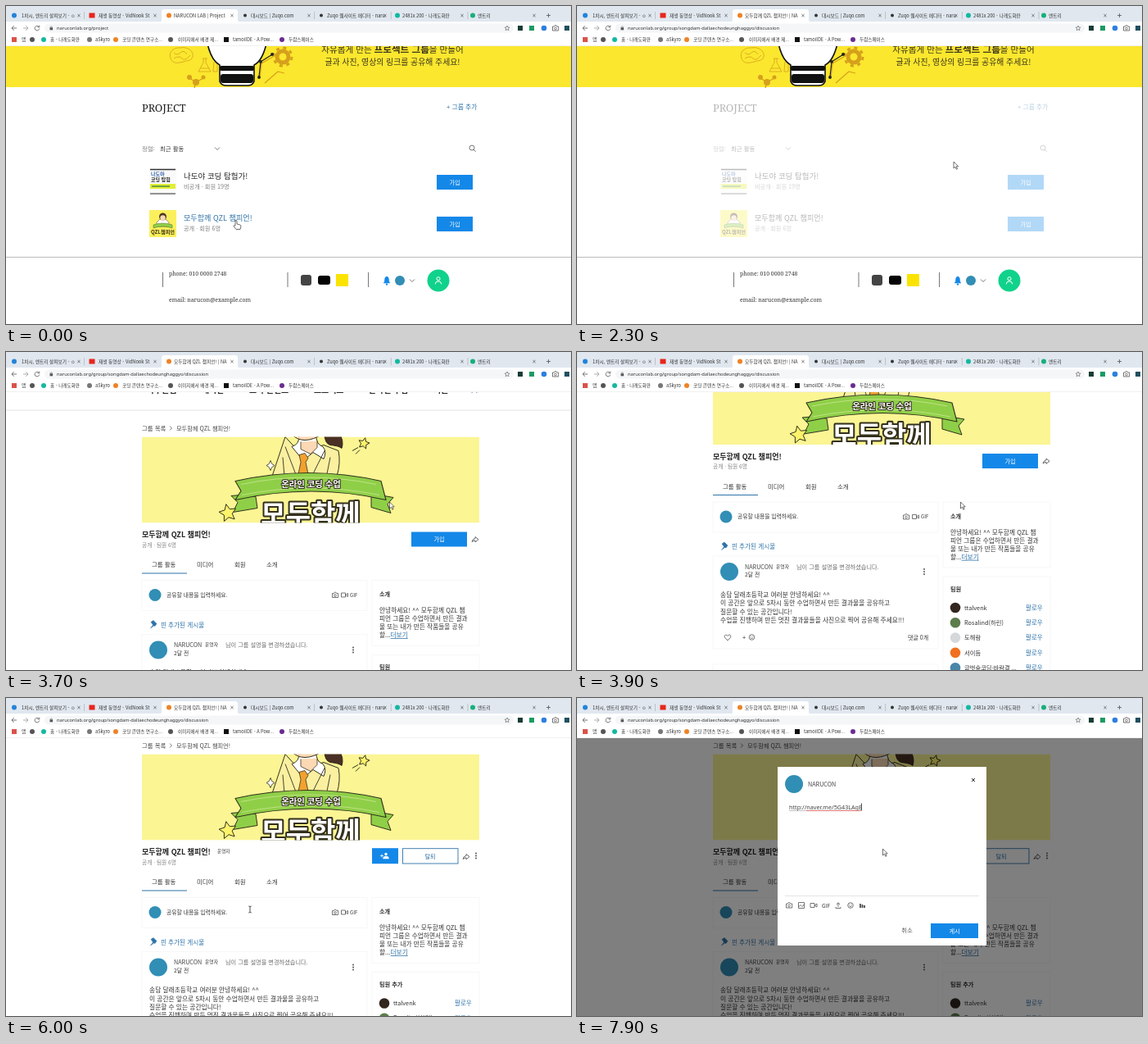
Animation, 690 px wide and 388 px high, one loop 8000 ms. Source, as an HTML page:

```html
<!DOCTYPE html>
<html lang="ko">
<head>
<meta charset="utf-8">
<style>
html, body { margin: 0; width: 100%; height: 100%; overflow: hidden; background: #fff; }
svg { display: block; width: 690px; height: 388px; font-family: "Noto Sans CJK KR", "Noto Sans CJK", "Noto Sans", sans-serif; }
text { white-space: pre; }
</style>
</head>
<body>
<svg id="stage" viewBox="0 0 690 388"></svg>
<script>
const BLUE = '#1488e8', LINK = '#2f73a8', GREY = '#808080', INK = '#333', YELLOW = '#fbe72e';
const GROUP = '모두함께 QZL 챔피언!', MID = 'text-anchor="middle"', BOLD = 'font-weight="500"', HEAVY = 'font-weight="700"';
const SERIF = 'font-family="Noto Serif, serif"', LATIN = 'font-family="Noto Sans, sans-serif"';

// y is the vertical middle of the line
const text = (x, y, size, str, fill = INK, more = '') =>
  `<text x="${x}" y="${y + size * .36}" font-size="${size}" fill="${fill}" ${more}>${str}</text>`;
const rect = (x, y, w, h, fill, more = '') =>
  `<rect x="${x}" y="${y}" width="${w}" height="${h}" fill="${fill}" ${more}/>`;
const dot = (x, y, r, fill, more = '') => `<circle cx="${x}" cy="${y}" r="${r}" fill="${fill}" ${more}/>`;
const path = (d, stroke = '#555', w = .8, fill = 'none') =>
  `<path d="${d}" fill="${fill}" stroke="${stroke}" stroke-width="${w}" stroke-linejoin="round"/>`;
const group = (id, body, more = '') => `<g id="${id}" ${more}>${body}</g>`;
const button = (x, y, w, h, label) => rect(x, y, w, h, BLUE) + text(x + w / 2, y + h / 2, 7.2, label, '#fff', MID + ' ' + BOLD);
const chevron = (x, y) => path(`M${x - 3} ${y - 1.5}l3 3 3-3`);
const camera = (x, y) => path(`M${x - 3.5} ${y - 2}h2l.8-1.3h1.6l.8 1.3h2v5h-7.2z`) + dot(x, y + .5, 1.4, 'none', 'stroke="#555" stroke-width=".7"');
const video = (x, y) => path(`M${x - 4} ${y - 2.5}h5v5h-5zM${x + 1} ${y}l3-2v4z`);
const smile = (x, y) => dot(x, y, 3.3, 'none', 'stroke="#555" stroke-width=".8"') + path(`M${x - 1.6} ${y + .6}q1.6 2 3.2 0M${x - 1.2} ${y - 1.5}v.9M${x + 1.2} ${y - 1.5}v.9`);
const more = (x, y) => [-3, 0, 3].map(d => dot(x, y + d, .9, '#444')).join('');
const share = (x, y) => path(`M${x - 4} ${y + 3}q1-4 4-4v-2l4 3.2-4 3.2v-2q-2 0-4 1.6z`, '#444');
const person = (x, y, s, c) => dot(x, y - 2 * s, 1.9 * s, 'none', `stroke="${c}"`) + path(`M${x - 3.4 * s} ${y + 4 * s}q0-3.5 ${3.4 * s}-3.5t${3.4 * s} 3.5`, c, 1);
const avatar = (x, y, r) => dot(x, y, r, '#318eb5');
const star = (x, y, r, turn = 0) => path('M' + Array.from({ length: 10 }, (_, i) => {
  const a = i * Math.PI / 5 - Math.PI / 2 + turn, q = i % 2 ? r * .48 : r;
  return (x + q * Math.cos(a)).toFixed(1) + ' ' + (y + q * Math.sin(a)).toFixed(1);
}).join('L') + 'z', '#33301c', 1, '#fff36a');

function browser() {
  const tabs = [
    ['1차시, 엔트리 살펴보기 - ㅇ', '#2384d8', 9, 19, 89], ['재생 동영상 - VidNook St', '#e8251c', 105, 113, 182],
    ['', '#ee8326', 198, 205, 276], ['대시보드 | Zuqo.com', '#333', 291, 299, 370],
    ['Zuqo 웹사이트 에디터 - naru', '#333', 384, 392, 463], ['2481x 200 - 나래도화판', '#14b8a0', 477, 484, 557],
    ['엔트리', '#16b07a', 569, 576, 645]];
  const marks = [
    [10, '#d9534a', 19, '앱'], [32, '#555', 0, ''], [46, '#14b8a0', 54, '홈 - 나래도화판'], [102, '#777', 109, 'aSkyro'],
    [134, '#ee8326', 142, '코딩 콘텐츠 연구소...'], [201, '#555', 210, '이미지에서 배경 제...'],
    [269, '#111', 277, 'tamolIDE - A Pow...'], [337, '#6a2c91', 345, '두람스페이스']];
  const icon = ([s, c, x], i) => i == 1 ? rect(x - 3.5, 8.5, 7, 6, c) : dot(x + 1, 11.5, c == '#333' ? 2 : 3, c);
  return rect(0, 0, 690, 20, '#e0e7ef') + rect(0, 19, 690, 30, '#fff') +
    '<path d="M187 20q3 0 3-4V7q0-3 3-3h87q3 0 3 3v9q0 4 3 4z" fill="#fff"/>' +
    tabs.map((tab, i) => icon(tab, i) + text(tab[3], 11.5, 5.7, tab[0], INK, i == 2 ? 'id="tab"' : '') +
      path(`M${tab[4] - 1.6} 10l3.2 3.2m0-3.2l-3.2 3.2`) +
      ([0, 3, 4, 5].includes(i) ? path(`M${95.5 + 93.7 * i} 7v9`, '#a4a8ad', .6) : '')).join('') +
    path('M660 11.5h5M662.5 9v5') +
    path('M13 27H7m2.7-2.8L7 27l2.7 2.8') + path('M21 27h6m-2.7-2.8L27 27l-2.7 2.8', '#999') +
    path('M40 25.2a2.8 2.8 0 1 0 .7 2.4M40.8 23.7v2.2h-2.3') +
    rect(47, 21.5, 573, 11, '#f4f6f8', 'rx="5.5"') + rect(53.5, 26.3, 3.6, 3, '#555') + path('M54.3 26.5v-1q1-1.5 2 0v1', '#555', .6) +
    text(62, 27, 5.8, '', INK, 'id="url" ' + LATIN) +
    path('M612 24l.9 2 2.1.2-1.6 1.4.5 2.1-1.9-1.1-1.9 1.1.5-2.1-1.6-1.4 2.1-.2z', '#555', .6) +
    rect(625, 24, 6, 6, '#173c35') + rect(639, 24, 6, 6, '#1c9a63') + dot(657, 27, 3.3, '#2d7fe0') + camera(671, 27) + rect(682, 24, 6, 6, '#1f5060') +
    marks.map(([ix, c, tx, s], i) => (i == 0 || i == 6 ? rect(ix - 3, 38, 6, 6, c) : dot(ix, 41, 3, c)) + text(tx, 41, 5.6, s)).join('') +
    path('M0 48.5h690', '#e6e6e6', .6);
}

function projectPage() {
  const tan = '#d5a01c';
  const band = rect(0, 49, 690, 50, YELLOW) +
    path('M201 64c-3-8 4-14 12-13 8-2 17 4 15 11-2 6-8 4-11 6l-5 1c-5 1-9 0-11-5zM205 57q4 4 8 0t8 2M205 64q7-4 10 0t10-4', tan) +
    path('M240 64h6m-5 0v5l-6 11h15l-6-11v-5M254 68l-1 12m5-12v12l-5 0M237 76h11', tan) +
    path('M224 88l8 5 9-5m-9 5l-2 7', tan, 1.4) + dot(224, 87, 3, tan) + dot(232, 93, 4, tan) + dot(241, 87, 2.5, tan) +
    dot(338, 62, 7, 'none', `stroke="${tan}" stroke-width="5"`) + dot(338, 62, 11, 'none', `stroke="${tan}" stroke-width="3" stroke-dasharray="4 4.64"`) +
    path('M310 88l2-18 14-8M316 94l16-14 8 2', tan, 1.2) +
    path('M246 46q5 21 15 26v20q2 5 8 5h26q6 0 8-5V72q10-5 15-26z', '#111', 1.6, '#fff') +
    rect(261, 73, 42, 6, '#111', 'rx="2"') + rect(262, 83, 40, 11, '#111', 'rx="3"') +
    path('M309 86l2-18 16-10', '#222', 1.2) + [[309, 87], [311, 68], [325, 59]].map(([x, y]) => dot(x, y, 1.9, '#222')).join('') +
    text(472, 53, 10.6, '자유롭게 만든 <tspan font-size="11.6" font-weight="700">프로젝트 그룹</tspan>을 만들어', '#3b351c', MID + ' ' + BOLD) +
    text(472, 68.5, 9.9, '글과 사진, 영상의 링크를 공유해 주세요!', '#3b351c', MID + ' ' + BOLD);
  const thumbs = rect(175, 198, 33, 33, '#fafafa') + path('M176 199.5h31', '#333', 1.5) + text(177, 205, 6, '나도야', '#2e62a8', HEAVY) +
    text(177, 212, 6, '코딩 탐험', '#222', HEAVY) + rect(176, 217, 31, 6, '#e2ee35') + path('M178 220h22', '#4a8d45', 1.5) + path('M176 229h31', '#666', 1.4) +
    rect(175, 249, 33, 33, '#fbf05c') + path('M184 264l4-4h7l4 4v5h-15z', '#6b5a30', .6, '#fff') + dot(191.5, 257, 4.5, '#4d3524') + dot(191.5, 258.5, 3.2, '#fbd9b5') +
    path('M180 267q11-4 23 0v4q-12-4-23 0z', '#4c6a27', .5, '#8fcf48') + text(191.5, 276, 6.2, 'QZL챔피언', '#3a3216', MID + ' ' + HEAVY);
  const list = text(166, 124, 12.8, 'PROJECT', '#222', SERIF) + text(538, 123.5, 7.8, '+ 그룹 추가', LINK) +
    text(166, 174, 7.4, '정렬:', GREY) + text(188, 174, 7.4, '최근 활동') + chevron(258, 174) +
    dot(569, 173, 3, 'none', 'stroke="#555" stroke-width=".8"') + path('M571.2 175.2l2.5 2.5') + thumbs +
    text(217, 207.5, 9.5, '나도야 코딩 탐험가!', '#222', BOLD) + text(217, 220.5, 7.2, '비공개 · 회원 19명', GREY) + button(526, 206, 44, 18, '가입') +
    text(217, 258.5, 9.1, GROUP, LINK, BOLD + ' id="hover"') + text(217, 271.5, 7.2, '공개 · 회원 6명', GREY) + button(526, 257, 44, 18, '가입');
  const foot = path('M0 306.5h690', '#aaa', .8) + path('M191.5 325v18M344 325v18M442.5 325v18', '#555') +
    text(199, 326.5, 6.9, 'phone: 010 0000 2748', '#333', SERIF) + text(199, 359, 6.9, 'email: narucon@example.com', '#333', SERIF) +
    rect(360, 328, 13, 13, '#444', 'rx="3"') + rect(381, 329, 15, 11, '#050505', 'rx="3"') + rect(403, 327, 15, 15, '#fbe300') +
    path('M461 338q1.5-1 1.5-4 0-3.5 2.5-4 2.5.5 2.5 4 0 3 1.5 4z', BLUE, .5, BLUE) + dot(465, 339.6, 1.2, BLUE) + avatar(481, 335, 6) + chevron(496, 335) +
    dot(528, 335, 13.5, '#10d28b') + person(528, 335, 1.1, '#fff');
  return band + group('list', list) + foot;
}

function banner() {
  const ink = '#33301c', green = '#8fcf48';
  const lettering = (w, weight) => MID + ` font-weight="${weight}" stroke="${ink}" stroke-width="${w}" stroke-linejoin="round" paint-order="stroke"`;
  return '<clipPath id="cut"><path d="M166 199h412v105H166z"/></clipPath><g clip-path="url(#cut)">' +
    rect(166, 199, 412, 105, '#fbf594') +
    path('M341 199l-16 48h79q5-16 2-31l-18-7-16 5-20-3z', ink, 1, '#fbf0a0') +
    path('M358 196q1 12-9 15l14 17 12-10 13 8q4-9-1-15-9-3-8-15z', ink, 1, '#fff') +
    path('M348 195q14 16 40 0z', ink, 1, '#fcd9b4') + path('M360 205v9l12 6 8-8v-8', ink, .8, '#fcd9b4') +
    path('M389 195q0 12 7 14 11 1 14 4 3-9-3-18z', '#32231b', 1, '#4a3024') +
    path('M358 221l7-2 4 6-3 5 4 19-7 9-7-9 4-19z', ink, .8, '#f2a12f') +
    path('M341 211l13 34M389 216l-17 34M338 224l2 23M396 224l-4 20', ink, .9) +
    path('M323 228q1 5 5 6-4 1-5 6-1-5-5-6 4-1 5-6z', ink, .8, '#fff') +
    star(437, 207, 7, .25) + path('M430 212l-7 4m9-1l-5 5', ink, 1) +
    path('M286 270l-11 1 8 8-6 12 30-5-2-14zM456 270l17 3-7 8 4 11-24-7v-13z', ink, 1, green) +
    path('M280 253q90-20 178 0l6 23q-90-21-184 0l7-11z', ink, 1.1, green) +
    path('M287 257q83-17 165 0M288 270q85-17 168 0', '#d5ea9b', .7) +
    text(372.5, 257.2, 10.4, '온라인 코딩 수업', '#fff', lettering(2, 700)) +
    star(271, 292, 11, -.2) +
    text(372, 293.5, 33, '모두함께', '#fff', lettering(4, 900)) + '</g>';
}

const post = (y, when) => avatar(186, y, 11) + text(205, y - 6, 7.2, 'NARUCON', '#444') + text(243, y - 6.5, 5.8, '운영자') +
  text(268, y - 6, 7.2, '님이 그룹 설명을 변경하셨습니다.', '#6c6c6c') + text(205, y + 4, 6.8, when) + more(424, y);

function groupPage() {
  const nav = [[172, '나루콘랩'], [239, '게시판'], [297, '교육 콘텐츠'], [376, '프로젝트'], [443, '온라인 수업'], [522, '회원']];
  const tabs = [[178, '그룹 활동'], [233, '미디어'], [279, '회원'], [318, '소개']];
  const about = ['안녕하세요! ^^ 모두함께 QZL 챔', '피언 그룹은 수업하면서 만든 결과', '물 또는 내가 만든 작품들을 공유', `할...<tspan fill="${LINK}" text-decoration="underline">더보기</tspan>`];
  const body = ['송담 달래초등학교 여러분 안녕하세요! ^^', '이 공간은 앞으로 5차시 동안 수업하면서 만든 결과물을 공유하고',
    '질문할 수 있는 공간입니다!', '수업을 진행하며 만든 멋진 결과물들을 사진으로 찍어 공유해 주세요!!!'];
  const team = [['ttalvenk', '#33261f'], ['Rosalind(하린)', '#5c7d4b'], ['도해람', '#d5d8da'], ['서이듬', '#f0701f'], ['글벗숲코딩·바람결 ...', '#4a86a8']];
  const card = (x, y, w, h) => rect(x, y, w, h, '#fff', 'stroke="#f4f4f4" stroke-width=".7"');
  return dot(371.5, 87, 15, '#24a0d5') + text(371.5, 111, 7.5, 'NARUCON LAB', '#666', MID + ' font-family="Lato, sans-serif" font-weight="300"') +
    nav.map(([x, s]) => text(x, 142, 9.9, s, '#2a2a2a', HEAVY)).join('') + person(572, 142, .9, '#6d86ad') + path('M0 166.5h690', '#dedede') +
    text(166, 188.5, 7.4, '그룹 목록', '#444') + path('M200 186l2.5 2.5-2.5 2.5') + text(208, 188.5, 7.2, GROUP, '#444') + banner() +
    text(166, 318.5, 9, GROUP, '#222', HEAVY) + text(166, 331, 6.7, '공개 · 팀원 6명', GREY) +
    group('before', button(495, 315, 68, 18, '가입') + share(573, 324)) +
    group('after', text(258, 317.5, 5.6, '운영자') + rect(447, 313.7, 32, 19, BLUE) + dot(464, 321, 1.7, '#fff') + path('M460.5 326.5q0-3 3.5-3t3.5 3z', '#fff', .5, '#fff') +
      path('M457 323h4m-2-2v4', '#fff') + rect(484.5, 314.2, 67.5, 18.3, '#fff', `stroke="${LINK}" stroke-width=".9"`) + text(518, 323.5, 7.2, '탈퇴', LINK, MID) + share(562, 324) + more(574, 323)) +
    tabs.map(([x, s]) => text(x, 355, 7.4, s)).join('') + path('M166 365.5h55', LINK, 1.2) +
    card(166, 374, 275, 37) + avatar(182, 392, 7.5) + text(196, 392, 6.8, '공유할 내용을 입력하세요.') + camera(402, 392) + video(413.5, 392) + text(420, 392, 6, 'GIF') +
    path('M177 425l3-2 4 4-2 3-1.5-.5-4 3 3-4z', LINK, .5, LINK) + text(189, 428.7, 7.6, '핀 추가된 게시물', LINK) +
    card(166, 440, 275, 113) + post(459, '2달 전') + body.map((s, i) => text(175, 487 + 10.4 * i, 7.75, s)).join('') +
    path('M184 543l-3.5-3.6q-1.3-2.5 1-3.3 1.8-.2 2.5 1.4.7-1.6 2.5-1.4 2.3.8 1 3.3z') + text(202, 539, 7.5, '+', INK, BOLD) + smile(213.5, 539) + text(404, 539, 7, '댓글 0개') +
    card(166, 572, 275, 90) + post(593, '한 달 전') +
    card(447, 374, 131, 80) + text(456, 391, 7.2, '소개', INK, HEAVY) + about.map((s, i) => text(456, 411 + 10 * i, 7.7, s)).join('') +
    card(447, 465, 131, 145) + text(456, 480, 7.2, '팀원', INK, HEAVY + ' id="team"') +
    team.map(([s, c], i) => dot(462, 503 + 18.3 * i, 6.3, c) + text(473, 503 + 18.3 * i, 7.3, s) + text(548, 503 + 18.3 * i, 7.5, '팔로우', LINK)).join('') +
    text(456, 596.5, 7.4, '전체 팀원 보기 (6명)', LINK);
}

function dialog() {
  return rect(0, 49, 690, 339, '#000', 'opacity=".5"') + rect(245, 84, 255, 218, '#fff') + avatar(265, 105, 11) +
    text(282, 105, 7.2, 'NARUCON', '#444') + path('M482 98l4 4m0-4l-4 4', '#333', 1) +
    group('link', text(259, 133, 7.2, 'http://naver.me/5G43LAgE', '#444', LATIN) +
      path('M259 137.5h21', '#999', .6) + path('M280 137.5h67', '#d9534f', .8) + path('M347.5 128.5v9', '#222')) +
    path('M254 241.5h237', '#ddd') + camera(259, 253) +
    path('M270.5 249.5h7v7h-7zM270.5 255l2.5-2.5 2 2 2.5-3') + video(289, 253) + text(304, 253.5, 6.6, 'GIF', INK, MID) +
    path('M319 255v-5m-2 2l2-2.3 2 2.3m-5 3v1.5h6V255') + smile(334, 253) + path('M346 256v-5m2.5 5v-4m2.5 4v-3', '#444', 1.7) +
    text(403, 283.5, 7.4, '취소', '#555', MID) + button(432, 275, 58, 18, '게시');
}

const cursors = group('arrow', path('M0 0v8l1.9-1.7 1.4 3 1.3-.6-1.4-2.9h2.5z', '#333', .7, '#fff')) +
  group('hand', path('M-1 1q1-1.5 2 0v4l4 1q1.3.6.9 2L5 11.5H0L-3 7.5q0-1.5 2-.3z', '#333', .7, '#fff')) +
  group('beam', path('M-1.7-4Q0-4 0-3V3Q0 4-1.7 4M1.7-4Q0-4 0-3m0 6Q0 4 1.7 4', '#222'));

const stage = document.getElementById('stage');
stage.innerHTML = rect(0, 0, 690, 388, '#fff') + projectPage() +
  group('site', rect(0, 0, 690, 800, '#fff') + group('scroll', groupPage())) +
  group('dialog', dialog()) + browser() + group('cursor', cursors);

const $ = id => document.getElementById(id);
const show = (id, on) => $(id).setAttribute('opacity', +on);
const move = (id, x, y) => $(id).setAttribute('transform', `translate(${x} ${y})`);

function at(t, keys) {
  const i = keys.findIndex(k => k[0] > t);
  if (i < 1) return keys.at(i).slice(1);
  const a = keys[i - 1], b = keys[i], p = (t - a[0]) / (b[0] - a[0]);
  return a.map((v, j) => v + (b[j] - v) * p).slice(1);
}

const scrolls = [[3500, 0], [3900, 191], [4000, 219], [5600, 219], [5900, 130.5]];
const pointer = [[1700, 281, 261], [2300, 460, 190], [2800, 468.5, 183], [4200, 468.5, 183], [4600, 497, 84], [4900, 526, 101],
  [5600, 526, 101], [6000, 298, 258], [6700, 298, 258], [7400, 373.5, 184]];

function draw(t) {
  const opened = t >= 2000, joined = t >= 5500;
  $('tab').textContent = opened ? '모두함께 QZL 챔피언! | NA' : 'NARUCON LAB | Project';
  $('url').textContent = 'naruconlab.org/' + (opened ? 'group/songdam-dallaechodeunghaggyo/discussion' : 'project');
  $('hover').setAttribute('fill', t < 1800 ? LINK : '#222');
  show('list', at(t, [[2000, 1], [2300, .32], [2400, 0]])[0]);
  show('site', at(t, [[2500, 0], [2800, 1]])[0]);
  move('scroll', 0, -at(t, scrolls)[0]);
  show('before', !joined);
  show('after', joined);
  $('team').textContent = joined ? '팀원 추가' : '팀원';
  show('dialog', at(t, [[6400, 0], [6700, 1]])[0]);
  show('link', t >= 7300);
  const hand = t < 1800 || (t >= 4800 && t < 5700), beam = t >= 6000 && t < 6900;
  show('hand', hand);
  show('beam', beam);
  show('arrow', !hand && !beam);
  move('cursor', ...at(t, pointer));
}

const start = performance.now();
function tick(now) {
  draw(Math.floor(Math.max(0, now - start) % 8000 / 100) * 100);
  requestAnimationFrame(tick);
}
tick(start);
</script>
</body>
</html>
```
